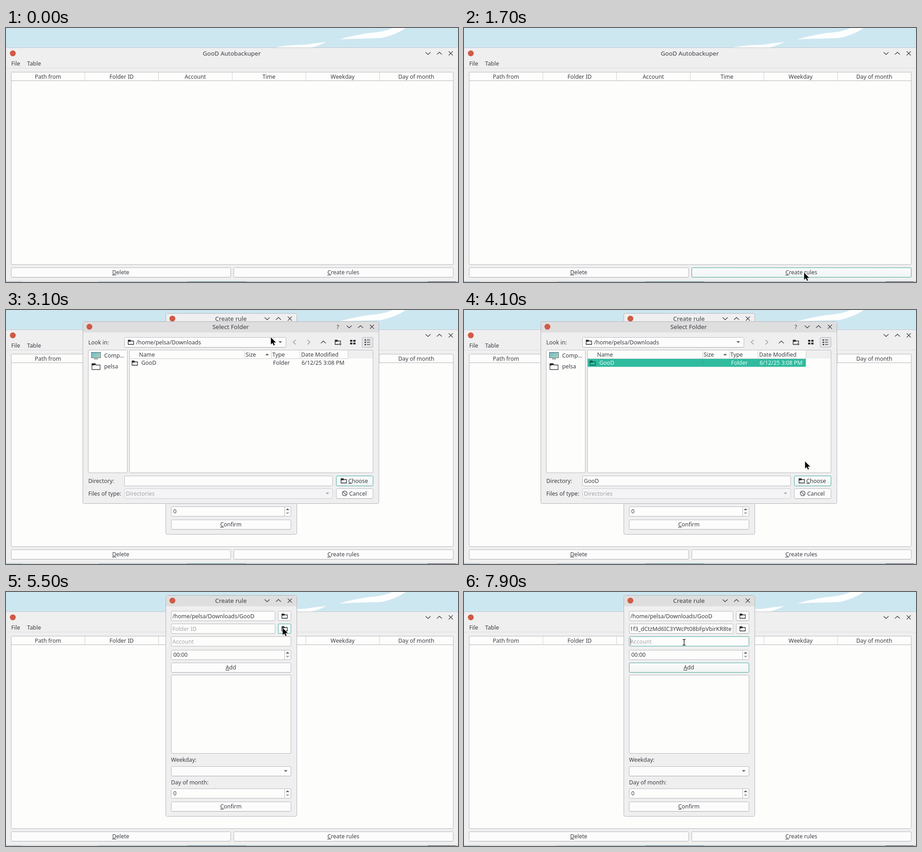
An HTML page that plays this animation: 997x561 px, repeating every 8 s.

```html
<!DOCTYPE html>
<html lang="en">
<head>
<meta charset="utf-8">
<title>Autobackuper</title>
<style>
html, body { margin: 0; width: 100%; height: 100%; overflow: hidden; background: #cde7f1; }
svg { display: block; width: 997px; height: 561px; }
text { font: 12.4px "Noto Sans", "Open Sans", sans-serif; fill: #3a3d41; white-space: pre; }
.title { font-size: 13.4px; }
.mid { text-anchor: middle; }
.end { text-anchor: end; }
.dim { fill: #a3a5a8; }
.light { fill: #f4fbf9; }
.u { text-decoration: underline; }
.line { fill: none; stroke: #3c3f43; stroke-width: 1.3; }
.pale { stroke: #8d9094; }
.off { display: none; }
</style>
</head>
<body>
<svg id="stage" viewBox="0 0 997 561"></svg>
<script>
const LOOP = 8000, STEP = 100;
const C = {
  win: '#efeff0', bar: '#dededf', view: '#fdfdfc', edge: '#b9b9bc', frame: '#b4b4b8',
  teal: '#45a89b', pick: '#2fbb9e', ink: '#26292c', logo: '#cf5a45'
};
const USER = 'pelsa', STORE = 'Zolnab Crate';
const HOME = `/home/${USER}/Downloads`;

// Shapes
const box = (x, y, r, b, fill, stroke = C.edge, rx = 2) =>
  `<rect x="${x + .5}" y="${y + .5}" width="${r - x}" height="${b - y}" rx="${rx}" fill="${fill}" stroke="${stroke}"/>`;
const fill = (x, y, r, b, color) =>
  `<rect x="${x}" y="${y}" width="${r - x}" height="${b - y}" fill="${color}"/>`;
const path = (d, cls = 'line', extra = '') => `<path class="${cls}" d="${d}" ${extra}/>`;
const solid = (d, color = C.ink) => `<path d="${d}" fill="${color}"/>`;
const label = (s, x, y, cls = '') => `<text x="${x}" y="${y + 4.5}" class="${cls}">${s}</text>`;
const key = s => `<tspan class="u">${s[0]}</tspan>${s.slice(1)}`;
const during = (times, body) => `<g class="off" data-on="${times}">${body}</g>`;

// Widgets
const logo = (x, y) => `<circle cx="${x}" cy="${y}" r="6.5" fill="${C.logo}"/>`;
const chevron = (x, y, dir, cls = 'line') => path({
  down: `M${x - 5.5} ${y - 2.5}l5.5 5 5.5 -5`,
  up: `M${x - 5.5} ${y + 2.5}l5.5 -5 5.5 5`,
  left: `M${x + 3} ${y - 5}l-5.5 5 5.5 5`,
  right: `M${x - 3} ${y - 5}l5.5 5 -5.5 5`
}[dir], cls);
const cross = (x, y) => path(`M${x - 4.5} ${y - 4.5}l9 9m0 -9l-9 9`);
const windowKeys = (x, y) => chevron(x - 50, y, 'down') + chevron(x - 25, y, 'up') + cross(x, y);
const button = (x, y, r, b, s = '') =>
  box(x, y, r, b, '#fcfcfd') + path(`M${x + 2} ${b + .5}H${r - 1}`, '', 'stroke="#aaaaae"') +
  (s && label(s, (x + r) / 2, (y + b) / 2, 'mid'));
const glow = (x, y, r, b, s = '') =>
  box(x, y, r, b, 'url(#glow)', C.teal) + (s && label(s, (x + r) / 2, (y + b) / 2, 'mid'));
const field = (x, y, r, b) => box(x, y, r, b, C.view);
const folder = (x, y, color = C.ink) =>
  `<path d="M${x - 6} ${y - 4.5}h4.5l1.5 2h6v7.5h-12z" fill="none" stroke="${color}" stroke-width="1.3"/>` +
  solid(`M${x - 6} ${y - 5}h5l1.5 3.5l-6.5 1z`, color);
const arrow = (x, y, up, color = '#606367') =>
  solid(`M${x - 4} ${y + (up ? 2 : -2)}h8l-4 ${up ? -4 : 4}z`, color);
const spin = (y, s) => field(364, y, 628, y + 21) +
  path(`M614.5 ${y + 1}v20`, '', `stroke="${C.edge}"`) +
  arrow(621, y + 6, true) + arrow(621, y + 15, false, '#a4a6a9') + label(s, 369, y + 10.5);
const frame = (x, y, r, b, title, closeX, titleX, active) => {
  const cy = y + 12;
  return box(x, y, r, b, C.win, C.frame, 3) +
    during(active, fill(x + 1, y + 1, r, y + 24.5, C.bar)) + logo(x + 15, cy) +
    label(title, titleX, cy, 'title mid') + windowKeys(closeX, cy);
};

function desktop() {
  return fill(0, 0, 997, 561, '#cde7f1') +
    solid('M735 25Q768 16 800 11Q835 9 852 0H882Q860 15 829 22Q795 23 735 25Z', '#fdfefe') +
    solid('M594 43Q622 37 660 37Q684 33 707 31Q688 40 674 43Z', '#fdfefe');
}

function mainWindow() {
  const heads = ['Path from', 'Folder ID', 'Account', 'Time', 'Weekday', 'Day of month'];
  const col = 162.5;
  let s = box(-1, 43, 997, 559, C.win, '#c3c6ca', 3) + logo(15, 56) +
    label('GooD Autobackuper', 498, 56.5, 'title mid') + windowKeys(981, 56) +
    label('File', 11.5, 78) + label('Table', 46.5, 78) +
    fill(0, 88, 997, 89, '#dcdce0') +
    box(11, 97, 986, 522, C.view, C.edge, 1) + fill(11, 116, 986, 117, '#b6b6ba');
  heads.forEach((h, i) => {
    s += label(h, 92.5 + i * col, 107, 'mid');
    if (i) s += fill(11 + i * col, 98, 12 + i * col, 116, '#cfcfd2');
  });
  return s + button(11, 529, 495, 550, key('Delete')) +
    button(502, 529, 986, 550, key('Create rules')) +
    during('1500 1800', glow(502, 529, 986, 550, key('Create rules'))) +
    fill(0, 560, 997, 561, '#b4d3df') + fill(35, 560, 205, 561, '#f2f8fa') +
    fill(400, 560, 530, 561, '#5d98b0') + fill(930, 560, 992, 561, '#556470');
}

function ruleWindow() {
  const browse = (y, times) => button(600, y, 628, y + 21) +
    during(times, glow(600, y, 628, y + 21)) + folder(614.5, y + 11);
  return frame(352, 7, 641, 495, 'Create rule', 626, 496, '1800 2900 4700 5900 7400 8000') +
    field(364, 42, 593, 63) + field(364, 70, 593, 91) + field(364, 98, 628, 119) +
    during('0 4700', label('Path from', 367, 53, 'dim')) +
    during('4700 8000', label(HOME + '/GooD', 367, 53)) +
    during('0 7400', label('Folder ID', 367, 81, 'dim')) +
    during('7400 8000', `<g clip-path="url(#id)">${label('1f3_dCtzMd6IC3YWcPt08bFpVbirKR8te', 590, 81, 'end')}</g>`) +
    browse(42, '2700 2900 4700 5400') + browse(70, '5400 5900 7400 7700') +
    during('7800 8000', box(364, 98, 628, 119, C.view, C.teal) + fill(367, 102, 368, 117, C.ink)) +
    label('Account', 367, 109, 'dim') + spin(128, '00:00') +
    button(364, 156, 628, 177, key('Add')) +
    during('1800 2700 7700 8000', glow(364, 156, 628, 177, key('Add'))) +
    box(364, 183, 628, 356, C.view, C.edge, 1) + label('Weekday:', 364, 370.5) +
    button(364, 385, 628, 406) + arrow(617, 395.5) +
    label('Day of month:', 364, 420) + spin(434, '0') +
    button(364, 463, 628, 484, key('Confirm'));
}

function folderWindow() {
  const bars = [526, 585, 648, 754].map(x => fill(x, 90, x + 1, 107, '#cdcdd0')).join('');
  const tiles = [[759, 66], [766, 66], [759, 72], [766, 72]]
    .map(([x, y]) => fill(x, y, x + 5, y + 4, C.ink)).join('');
  const rows = [65, 70, 75].map(y => fill(791, y, 794, y + 2.5, C.ink) + fill(796, y + .5, 803, y + 1.7, C.ink)).join('');
  return frame(169, 25, 822, 427, 'Select Folder', 807, 495.5, '0 8000') +
    label('?', 732, 37, 'title mid') +
    label('Look in:', 181.5, 71) + button(261, 60, 617, 82) + folder(275.5, 71) +
    label(HOME, 287, 71) + arrow(605, 71) +
    chevron(636, 71, 'left', 'line pale') + chevron(668, 71, 'right', 'line pale') + chevron(700, 71, 'up') +
    folder(732, 71) + fill(734, 73, 740, 79, C.win) + path('M737 72.5v6m-3 -3h6') +
    tiles + box(785, 60, 809, 82, '#e4e4e7', '#b7b7bb') + rows +
    box(181, 88, 267, 359, C.view, C.edge, 1) + box(272, 88, 809, 359, C.view, C.edge, 1) +
    fill(188, 93, 209, 106, '#5b6870') + fill(189, 94, 208, 105, 'url(#screen)') +
    fill(194, 107, 203, 109, '#8a8f93') + label('Comp...', 216.5, 100.5) +
    path('M189.5 118.5h7l2 3h9v10h-18z') + solid('M189 118h8l2 3l-10 2z') + label(USER, 216.5, 124.5) +
    fill(754, 89, 809, 107, C.win) + bars + fill(273, 107, 755, 108, '#cdcdd0') +
    label('Name', 293.5, 98) + label('Size', 528.5, 98) + arrow(576, 98, true) +
    label('Type', 587.5, 98) + label('Date Modified', 651, 98) +
    during('0 3600', folderRow('')) +
    during('3600 8000', fill(273, 108, 754, 125.5, C.pick) + folderRow('light') + fill(526, 108, 527, 125, '#2aa98f')) +
    label('Directory:', 181.5, 377) + field(261, 366, 720, 388) +
    during('3600 8000', label('GooD', 264.5, 377)) +
    glow(728, 366, 809, 388) + folder(745, 377) + label(key('Choose'), 755, 377) +
    label('Files of type:', 181.5, 405) + box(261, 394, 720, 416, '#f4f4f6', '#cfcfd3') +
    label('Directories', 264.5, 405, 'dim') + arrow(709, 405, false, '#a8aaad') +
    button(728, 394, 809, 416) + '<circle class="line" cx="747" cy="405" r="5.2"/>' + path('M743.4 401.4l7.2 7.2') +
    label('Cancel', 757, 405);
}

function folderRow(cls) {
  return folder(284, 117, cls ? '#14594d' : C.ink) + label('GooD', 298.5, 116.5, cls) +
    label('Folder', 589, 116.5, cls) + label('6/12/25 3:08 PM', 652, 116.5, cls);
}

function storeWindow() {
  const twig = (y, color = '#606367') => solid(`M394 ${y - 3.5}l4 3.5l-4 3.5z`, color);
  const items = ['demo', 'GooD', 'doc'].map((s, i) => {
    const y = 186.5 + i * 15.4;
    return twig(y) + label(s, 409.5, y);
  }).join('');
  return frame(352, 128, 641, 375, `Select ${STORE} Folder`, 626, 478, '0 8000') +
    box(364, 163, 628, 335, C.view, C.edge, 1) + arrow(375.5, 171) + label('Root', 389, 171) + items +
    during('6500 8000', fill(365, 194, 628.5, 209.5, C.pick) + twig(202, '#14594d') + label('GooD', 409.5, 202, 'light')) +
    glow(364, 342, 628, 364, 'Select');
}

const stage = document.getElementById('stage');
stage.innerHTML = `<defs>
  <linearGradient id="glow" x2="0" y2="1"><stop offset="0" stop-color="#fbfcfc"/><stop offset="1" stop-color="#f1f4f4"/></linearGradient>
  <linearGradient id="screen" x2="1" y2="1"><stop offset="0" stop-color="#6fb6d2"/><stop offset="1" stop-color="#a9d7b0"/></linearGradient>
  <clipPath id="id"><rect x="365" y="71" width="228" height="20"/></clipPath></defs>` +
  desktop() + mainWindow() +
  during('1800 8000', ruleWindow()) +
  during('2900 4700', folderWindow()) +
  during('5900 7400', storeWindow()) +
  `<g id="pointer">
    ${during('1200 7600', '<path d="M0 0V16.5L3.8 13L6.4 18.6L9.2 17.4L6.8 12H12Z" fill="#050505" stroke="#fff" stroke-width=".5"/>')}
    ${during('7600 8000', path('M-2.5 -6.5q3 0 3 2v9q0 2 -3 2m6 -13q-3 0 -3 2m0 9q0 2 3 2', 'line', 'style="stroke:#111"'))}
  </g>`;

// Pointer stops: time, x, y
const stops = [
  [1100, 815, 575], [1400, 795, 545], [1600, 750, 540], [1900, 750, 540],
  [2600, 604, 51], [2700, 612, 53], [3000, 612, 53], [3500, 340, 117], [3700, 340, 117],
  [4100, 752, 334], [4400, 768, 376], [4700, 768, 376], [5400, 610, 79], [5900, 610, 79],
  [6400, 430, 202], [6600, 430, 202], [6900, 506, 363], [7000, 506, 355],
  [7300, 506, 355], [7700, 485, 111]
];

function pointerAt(t) {
  const i = stops.findIndex(p => p[0] > t);
  if (i === 0) return stops[0].slice(1);
  if (i < 0) return stops[stops.length - 1].slice(1);
  const [t0, x0, y0] = stops[i - 1], [t1, x1, y1] = stops[i];
  const k = (t - t0) / (t1 - t0), e = k * k * (3 - 2 * k);
  return [Math.round(x0 + (x1 - x0) * e), Math.round(y0 + (y1 - y0) * e)];
}

const parts = [...stage.querySelectorAll('[data-on]')].map(el => ({ el, on: el.dataset.on.split(' ').map(Number) }));
const pointer = document.getElementById('pointer');

function draw(now) {
  const t = Math.floor(now % LOOP / STEP) * STEP;
  for (const { el, on } of parts) {
    // An odd count of passed limits means the part is showing.
    el.classList.toggle('off', on.filter(limit => limit <= t).length % 2 === 0);
  }
  pointer.setAttribute('transform', `translate(${pointerAt(t)})`);
}

const start = performance.now();
function tick() {
  draw(performance.now() - start);
  requestAnimationFrame(tick);
}
tick();
</script>
</body>
</html>
```
